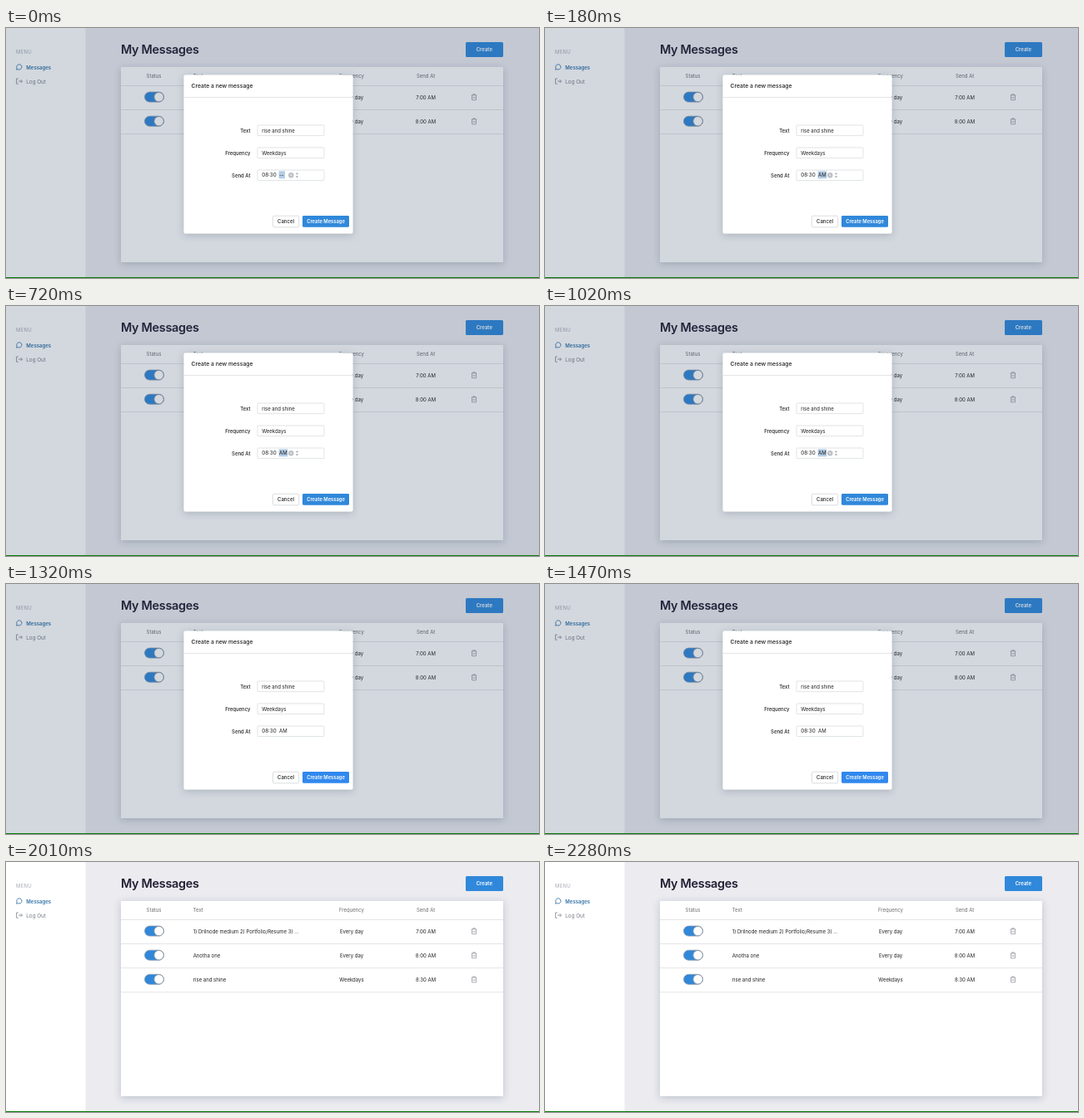
Animation, 640 px wide and 301 px high, one loop 2760 ms. Source, as an HTML page:

```html
<!DOCTYPE html>
<html lang="en">
<head>
<meta charset="utf-8">
<title>My Messages</title>
<style>
  html, body { margin: 0; width: 100%; height: 100%; overflow: hidden; }
  svg { display: block; width: 100vw; height: 100vh; }
  text { font: 6px Inter, "Open Sans", sans-serif; fill: #222; }
  .mid { text-anchor: middle; }
  .end { text-anchor: end; }
  .head { fill: #6c6c72; }
  .bold { font-weight: 600; }
  .white { fill: #fff; }
  .line { stroke: #e4e5e8; }
  .icon { fill: none; stroke: #8d9097; stroke-width: .7; }
  .blue { fill: #3088da; }
  .field { fill: #fff; stroke: #d9dce0; stroke-width: .8; }
</style>
</head>
<body>
<svg viewBox="0 0 640 301">
  <defs>
    <filter id="shadow" x="-10%" y="-10%" width="120%" height="125%">
      <feDropShadow dx="0" dy="2" stdDeviation="4" flood-color="#303858" flood-opacity=".25"/>
    </filter>
    <g id="toggle">
      <rect x="-11.5" y="-6" width="23" height="12" rx="6" class="blue" stroke="#8797ab" stroke-width=".8"/>
      <circle cx="5.6" r="5.7" fill="#fff" stroke="#8b8f98" stroke-width=".8"/>
    </g>
    <path id="trash" class="icon" d="M-3.2-2.4H3.2M-1.2-2.4V-3.6H1.2V-2.4M-2.5-2.4V3.4H2.5V-2.4M-.9-.4V1.6M.9-.4V1.6"/>
  </defs>

  <rect width="640" height="301" fill="#ebebf0"/>
  <rect width="95.5" height="301" fill="#fff"/>
  <text x="12" y="30.5" style="fill:#a9adb5;letter-spacing:.04em">MENU</text>
  <path class="icon" style="stroke:#3c78ad;stroke-width:.9" d="M12.6 50.2L13.1 48.3A3.1 3.1 0 1 1 14.5 49.7Z"/>
  <text x="24.3" y="49.6" class="bold" style="fill:#3474aa">Messages</text>
  <path class="icon" style="stroke-width:.9" d="M14.8 61H12.6V67.2H14.8M15 64.1H19.4M17.7 62.2L19.6 64.1L17.7 66"/>
  <text x="24.3" y="66.5" style="fill:#777c86;font-size:6.3px">Log Out</text>

  <text x="138" y="31.2" style="font-size:14.4px;font-weight:600;letter-spacing:-.02em;fill:#211d31">My Messages</text>
  <rect x="552" y="17" width="45" height="18" rx="1.6" class="blue"/>
  <text x="574.3" y="28.3" class="mid bold white">Create</text>

  <rect x="138" y="47" width="459" height="235" rx="1" fill="#fff" filter="url(#shadow)"/>
  <path class="line" d="M138 69.5H597"/>
  <text x="177.5" y="60.2" class="mid head">Status</text>
  <text x="224.7" y="60.2" class="head">Text</text>
  <text x="415" y="60.2" class="mid head">Frequency</text>
  <text x="504" y="60.2" class="mid head">Send At</text>
  <g id="rows"></g>

  <g id="modal">
    <rect width="640" height="301" fill="rgb(35,60,90)" opacity=".2"/>
    <rect x="213.5" y="56.5" width="203" height="191" rx="2" fill="#fff" filter="url(#shadow)"/>
    <text x="222.5" y="72.3" style="font-size:6.8px;font-weight:500">Create a new message</text>
    <path class="line" d="M213.5 83.5H416.5"/>
    <g id="fields"></g>
    <text x="307.2" y="179.3" style="font-size:6.3px">08:30</text>
    <rect id="selection" x="327.6" y="172.3" height="9" fill="#b4cde6"/>
    <text id="period" x="328.1" y="179.3"></text>
    <g id="controls">
      <circle cx="342.3" cy="177.2" r="3.2" fill="#b9bdc3"/>
      <path d="M341.1 176L343.5 178.4M343.5 176L341.1 178.4" stroke="#fff" stroke-width=".7"/>
      <path d="M347.9 176.2L349.5 174L351.1 176.2ZM347.9 178.2L349.5 180.4L351.1 178.2Z" fill="#a3a8af"/>
    </g>
    <rect x="320.4" y="226.2" width="31.3" height="13.6" rx="1.4" class="field" style="stroke:#cfd3d8"/>
    <text x="336" y="235.1" class="mid" style="font-weight:500">Cancel</text>
    <rect id="confirm" x="356" y="226" width="56" height="13.7" rx="1.4"/>
    <text x="384" y="235" class="mid bold white" style="font-size:5.8px">Create Message</text>
  </g>
  <rect y="300" width="640" height="1" fill="#087a08"/>
</svg>
<script>
  const LOOP = 2760, TYPED = 60, PRESSED = 1320, CLOSED = 1530, ADDED = 1590;
  const $ = id => document.getElementById(id);
  const show = (el, on) => { el.style.display = on ? "" : "none"; };

  const messages = [
    ["1) Drilnode medium 2) Portfolio/Resume 3) ...", "Every day", "7:00 AM"],
    ["Anotha one", "Every day", "8:00 AM"],
    ["rise and shine", "Weekdays", "8:30 AM"],
  ];
  $("rows").innerHTML = messages.map(([text, frequency, time], i) => `
    <g transform="translate(0 ${83.3 + i * 29.1})">
      <use href="#toggle" x="178" y="-.2"/>
      <text x="224.7" y="2.8">${text}</text>
      <text x="415" y="2.8" class="mid">${frequency}</text>
      <text x="504" y="2.8" class="mid">${time}</text>
      <use href="#trash" x="562"/>
      <path class="line" d="M138 15.2H597"/>
    </g>`).join("");
  const newRow = $("rows").lastElementChild;

  const fields = [["Text", "rise and shine"], ["Frequency", "Weekdays"], ["Send At", ""]];
  $("fields").innerHTML = fields.map(([label, value], i) => {
    const y = 117 + i * 27;
    return `<text x="293.5" y="${y + 8.6}" class="end" style="font-weight:500">${label}</text>
      <rect x="302" y="${y}" width="80" height="12.6" rx="1" class="field"/>
      <text x="307.2" y="${y + 8.6}">${value}</text>`;
  }).join("");

  function draw(t) {
    const typed = t >= TYPED, pressed = t >= PRESSED;
    show($("modal"), t < CLOSED);
    show(newRow, t >= ADDED);
    show($("selection"), !pressed);
    show($("controls"), !pressed);
    $("period").textContent = typed ? "AM" : "--";
    $("selection").setAttribute("width", typed ? 10.6 : 7.4);
    $("confirm").setAttribute("fill", pressed ? "#3188ee" : "#3088da");
  }

  const start = performance.now();
  function tick() {
    draw((performance.now() - start) % LOOP);
    requestAnimationFrame(tick);
  }
  tick();
</script>
</body>
</html>
```
